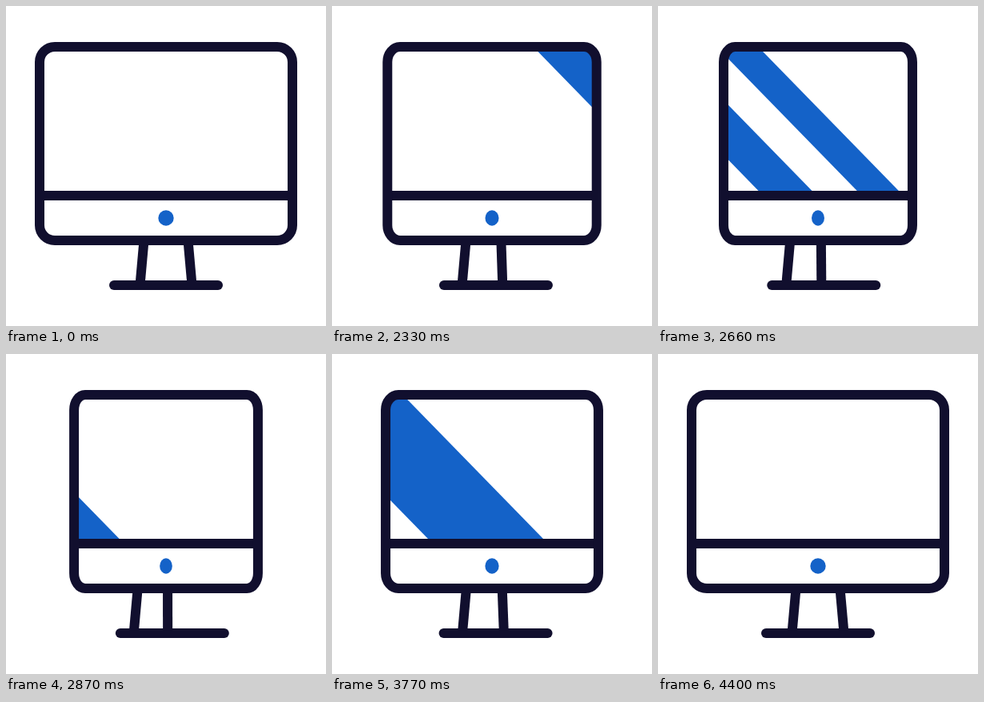
These frames come from a looping animation (400 px wide and 400 px high, 4430 ms). An HTML page with a canvas:

```html
<!DOCTYPE html>
<html lang="en">
<head>
<meta charset="utf-8">
<title>Turning monitor</title>
<style>
  html, body { margin: 0; width: 100%; height: 100%; overflow: hidden; background: #fff; }
  canvas { display: block; }
</style>
</head>
<body>
<canvas id="stage" width="400" height="400"></canvas>
<script>
const ctx = document.getElementById('stage').getContext('2d');
const LOOP = 4430, TURN = 2000, BACK = 3200, PHASE = 1200;
const INK = '#110f2e', BLUE = '#1462c8';
const TOP = 51, SHELF = 237, SLOPE = 1.025;

const clamp = (v, lo = 0, hi = 1) => Math.min(hi, Math.max(lo, v));
const outCubic = u => 1 - (1 - u) ** 3;
const inOutCubic = u => u < 0.5 ? 4 * u ** 3 : 1 - 4 * (1 - u) ** 3;
const phase = (t, start) => clamp((t - start) / PHASE);

function line(x1, y1, x2, y2, cap = 'butt') {
  ctx.lineCap = cap;
  ctx.beginPath();
  ctx.moveTo(x1, y1);
  ctx.lineTo(x2, y2);
  ctx.stroke();
}

// Diagonal glare band; left and right are its edges at y = 57.
function band(left, right) {
  const at = (x, y) => [x + (y - 57) / SLOPE, y];
  ctx.beginPath();
  ctx.moveTo(...at(left, TOP));
  ctx.lineTo(...at(right, TOP));
  ctx.lineTo(...at(right, SHELF));
  ctx.lineTo(...at(left, SHELF));
  ctx.fill();
}

function centredBand(mid, width) {
  band(mid - width / 2, mid + width / 2);
}

function drawGlare(t) {
  if (t > TURN && t < BACK) {
    const first = clamp((t - 2510) / 150, -4, 4.85);
    const second = clamp((t - 2660) / 150, -4.5, 4.85);
    const slide = s => -136 * s + 14 * s * s;
    centredBand(112 + slide(first), 70 - 3 * first);
    centredBand(106 + slide(second), 52 + 5 * second);
  } else if (t >= BACK) {
    const left = -360 + 720 * inOutCubic(phase(t, BACK));
    band(left, left + 144);
  }
}

function draw(t) {
  const turn = outCubic(phase(t, TURN)) - inOutCubic(phase(t, BACK));
  const half = 158 - 44 * turn;
  const left = 200 - half, right = 200 + half;

  ctx.fillStyle = '#fff';
  ctx.fillRect(0, 0, 400, 400);
  ctx.fillStyle = BLUE;
  ctx.strokeStyle = INK;
  ctx.lineWidth = 12;

  const body = new Path2D();
  body.roundRect(left, TOP, 2 * half, 242, { x: 19 * half / 158, y: 19 });
  ctx.save();
  ctx.clip(body);
  drawGlare(t);
  ctx.restore();

  ctx.beginPath();
  ctx.ellipse(200, 265, 9.7 - 1.9 * turn, 9.7, 0, 0, 2 * Math.PI);
  ctx.fill();

  line(172.5 - 8 * turn, 293, 167.5 - 8 * turn, 349);
  line(227.5 - 26 * turn, 293, 232.5 - 31 * turn, 349);
  line(135 + 8 * turn, 349, 265 + 8 * turn, 349, 'round');
  line(left, SHELF, right, SHELF);
  ctx.stroke(body);
}

function tick(now) {
  draw(now % LOOP);
  requestAnimationFrame(tick);
}
requestAnimationFrame(tick);
</script>
</body>
</html>
```
